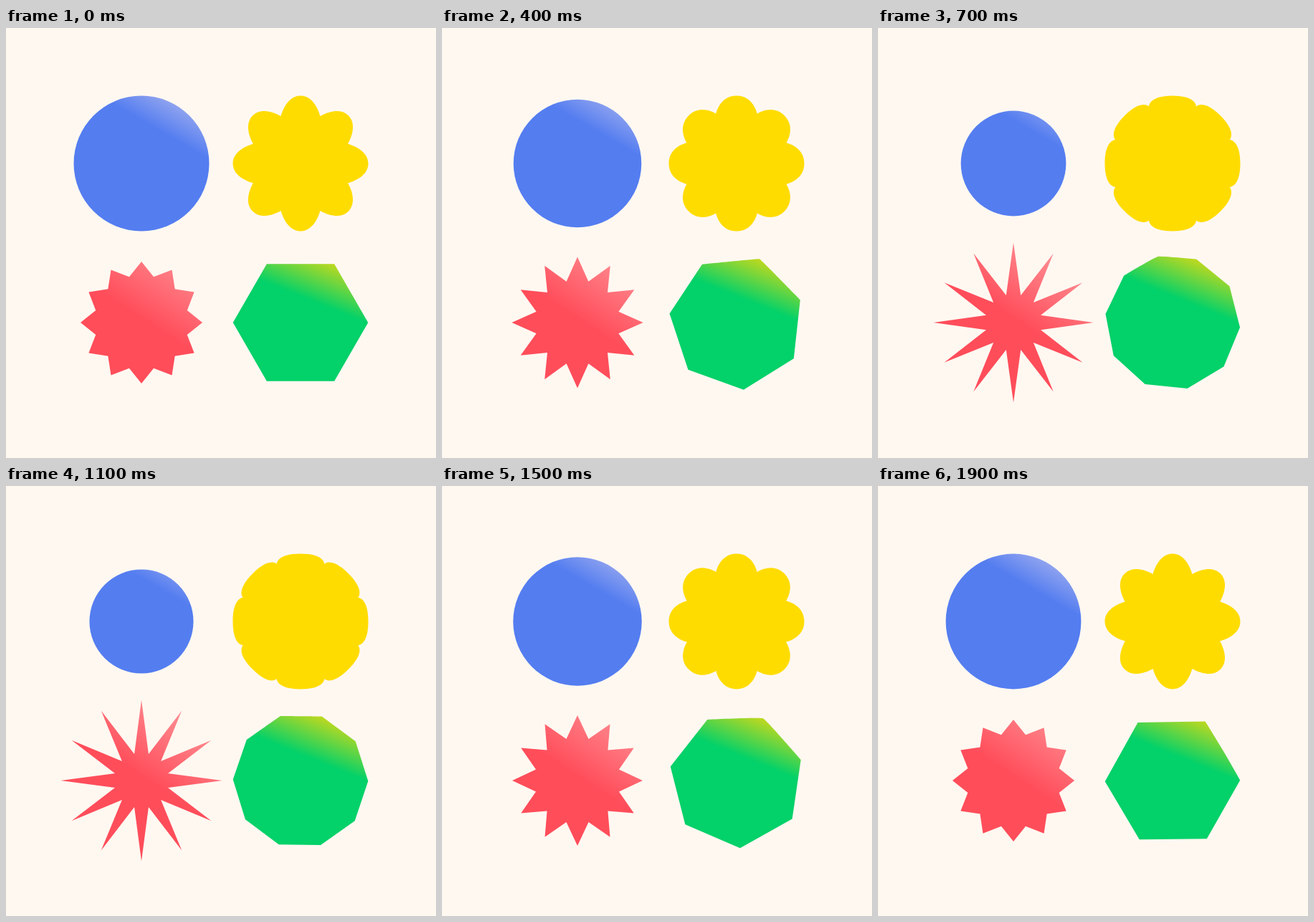
Animation, 600 px wide and 600 px high, one loop 2000 ms. Source, as an HTML page with a canvas:

```html
<!DOCTYPE html>
<html>
<head>
<meta charset="utf-8">
<style>
  html, body { margin: 0; width: 100%; height: 100%; overflow: hidden; background: #fff8f1; }
  canvas { display: block; }
</style>
</head>
<body>
<canvas id="stage" width="600" height="600"></canvas>
<script>
const ctx = document.getElementById('stage').getContext('2d');
const LOOP = 2000, STEP = 100, RAD = Math.PI / 180;
const mix = (a, b, p) => a + (b - a) * p;

// Cubic bezier easing (.83, 0, 0, 1), solved by bisection.
function ease(x) {
  let low = 0, high = 1;
  for (let i = 0; i < 30; i++) {
    const s = (low + high) / 2;
    if (2.49 * s * (1 - s) ** 2 + s ** 3 < x) low = s; else high = s;
  }
  return low * low * (3 - 2 * low);
}

// Angles are in degrees, clockwise from the top.
const polar = (r, deg) => [r * Math.sin(deg * RAD), -r * Math.cos(deg * RAD)];

// Gradient across the shape, from one distance to another along a direction.
function sheen(deg, from, to, base, light) {
  const g = ctx.createLinearGradient(...polar(from, deg), ...polar(to, deg));
  g.addColorStop(0, base);
  g.addColorStop(1, light);
  return g;
}

function shape(x, y, fill, trace) {
  ctx.save();
  ctx.translate(x, y);
  ctx.beginPath();
  trace();
  ctx.closePath();
  ctx.fillStyle = fill;
  ctx.fill();
  ctx.restore();
}

function star(outer, inner) {
  for (let i = 0; i < 24; i++) ctx.lineTo(...polar(i % 2 ? inner : outer, i * 15));
}

function flower(valley, handle) {
  const tip = 94.5;
  const reach = Math.hypot(tip, handle), lean = Math.atan2(handle, tip) / RAD;
  ctx.moveTo(...polar(valley, -22.5));
  for (let a = 0; a < 360; a += 45) {
    const end = polar(valley, a + 22.5);
    ctx.bezierCurveTo(...polar(valley, a - 22.5), ...polar(reach, a - lean), ...polar(tip, a));
    ctx.bezierCurveTo(...polar(reach, a + lean), ...end, ...end);
  }
}

// Polygon with a fractional side count: a new corner swells out of the last gap.
function polygon(sides, turn) {
  const r = 94.3, step = 360 / sides, whole = Math.floor(sides + 1e-9);
  const part = Math.max(0, sides - whole);
  const first = turn + step, last = turn + whole * step;
  for (let i = 1; i <= whole; i++) ctx.lineTo(...polar(r, turn + i * step));

  const half = (360 + first - last) / 2, middle = last + half;
  const flat = r * Math.cos(half * RAD);
  const peak = mix(flat, r, 1 - (1 - part) ** 3.5);
  const handle = (1 - part) * 0.5 * r * Math.sin(half * RAD);
  const reach = Math.hypot(peak, handle), lean = Math.atan2(handle, peak) / RAD;
  const start = polar(r, last), end = polar(r, first);
  ctx.bezierCurveTo(...start, ...polar(reach, middle - lean), ...polar(peak, middle));
  ctx.bezierCurveTo(...polar(reach, middle + lean), ...end, ...end);
}

function draw(time) {
  const t = Math.floor((time % LOOP) / STEP) * STEP / 1000;
  const p = t < 1 ? ease(t) : 1 - ease(t - 1);

  ctx.fillStyle = '#fff8f1';
  ctx.fillRect(0, 0, 600, 600);

  shape(189, 189, sheen(30, 52, 95, '#547df0', '#8fa3ef'),
    () => ctx.arc(0, 0, mix(94.5, 72.4, p), 0, 2 * Math.PI));
  shape(411, 189, '#ffdc00', () => flower(mix(71.5, 86.8, p), mix(20.5, 34, p)));
  shape(189, 411, sheen(33, 5, 105, '#ff4d5a', '#ff8a90'),
    () => star(mix(85, 112.7, p), mix(66, 38.2, p)));
  shape(411, 411, sheen(22, 34, 92, '#03d169', '#b9d821'),
    () => polygon(mix(6, 10, p), mix(30, -18, p)));
}

const origin = performance.now();
function tick() {
  draw(performance.now() - origin);
  requestAnimationFrame(tick);
}
tick();
</script>
</body>
</html>
```
